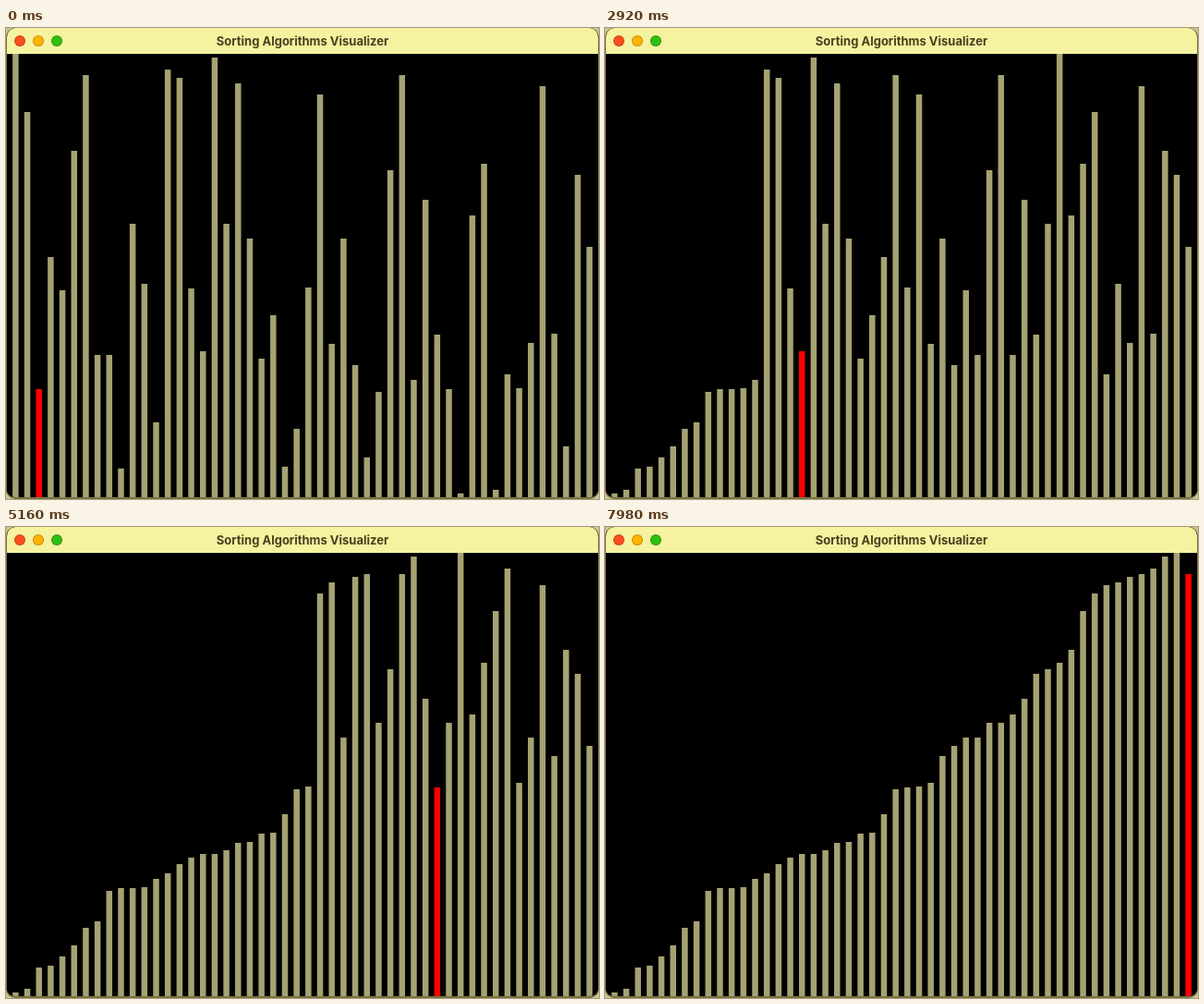
These frames come from a looping animation (642x510 px, 8000 ms). An HTML page with a canvas:

```html
<!DOCTYPE html>
<html lang="en">
<head>
<meta charset="utf-8">
<title>Sorting Algorithms Visualizer</title>
<style>
  html, body { margin: 0; width: 100%; height: 100%; overflow: hidden; background: #c9c68f; }
  .window {
    position: absolute; left: 0; top: 0; width: 642px; height: 510px;
    box-sizing: border-box; overflow: hidden;
    border: solid #77733f; border-width: 0 1px 2px;
    border-radius: 10px; background: #000;
  }
  .title {
    position: absolute; left: -1px; top: 0; width: 642px; height: 28px;
    background: #f5f2a0; color: #47411f;
    font: 700 13px/28px Inter, "Open Sans", sans-serif; text-align: center;
  }
  .light {
    position: absolute; top: 8px; width: 12px; height: 12px;
    box-sizing: border-box; border: 1px solid rgba(90, 40, 0, .3); border-radius: 50%;
  }
  canvas { position: absolute; left: -1px; top: 0; }
</style>
</head>
<body>
<div class="window">
  <canvas id="stage" width="642" height="510"></canvas>
  <div class="title">Sorting Algorithms Visualizer
    <span class="light" style="left:9px;background:#ff4d20"></span>
    <span class="light" style="left:29px;background:#ffb400"></span>
    <span class="light" style="left:49px;background:#2cc010"></span>
  </div>
</div>
<script>
  const LOOP = 8000, FLOOR = 508, PITCH = 12.68;
  const ctx = document.getElementById('stage').getContext('2d');

  // Top edge of each bar; the fractions only order bars that look equal.
  const tops = [
    28, 91, 391, 248, 284, 133, 51, 354, 354.3, 477,
    212.3, 277, 427, 45, 54, 282, 350, 32, 212, 60,
    228, 358, 311, 475, 434, 281, 72, 342, 228.3, 365,
    465, 394, 154, 51, 381, 186, 332, 391.3, 504, 203,
    147, 500, 375, 390, 341, 63, 331, 453, 159, 237
  ];

  // Selection sort, recorded at each new minimum and after each swap.
  function record(bars) {
    const steps = [];
    const snap = (...red) => steps.push({ bars: bars.slice(), red });
    for (let i = 0; i < bars.length - 1; i++) {
      let min = i;
      for (let j = i + 1; j < bars.length; j++) {
        if (bars[j] > bars[min]) {
          min = j;
          snap(j);
        }
      }
      [bars[i], bars[min]] = [bars[min], bars[i]];
      snap(i, min);
    }
    return steps;
  }
  const steps = record(tops.slice());

  // Pace of the sort: [tick, step] pairs, linear in between.
  const pace = [[0, 1], [26, 29], [49, 52], [76, 83], [110, 117], [148, 154], [171, 177]];

  function stepAt(tick) {
    const k = Math.max(1, pace.findIndex(p => p[0] >= tick));
    const [t0, s0] = pace[k - 1], [t1, s1] = pace[k];
    return Math.floor(s0 + (tick - t0) * (s1 - s0) / (t1 - t0) + 1e-6);
  }

  // Three uneven ticks every 140 ms.
  function tickAt(ms) {
    const rest = ms % 140;
    return Math.floor(ms / 140) * 3 + (rest < 20 ? 0 : rest < 120 ? 1 : 2);
  }

  function draw({ bars, red }) {
    ctx.fillStyle = '#000';
    ctx.fillRect(0, 0, 642, 510);
    bars.forEach((top, i) => {
      const y = Math.floor(top);
      ctx.fillStyle = red.includes(i) ? '#f00' : '#a5a273';
      ctx.fillRect(7.1 + i * PITCH, y, 6.5, FLOOR - y);
    });
  }

  const start = performance.now();
  function frame() {
    const ms = (performance.now() - start) % LOOP;
    draw(steps[stepAt(tickAt(ms))]);
    requestAnimationFrame(frame);
  }
  frame();
</script>
</body>
</html>
```
